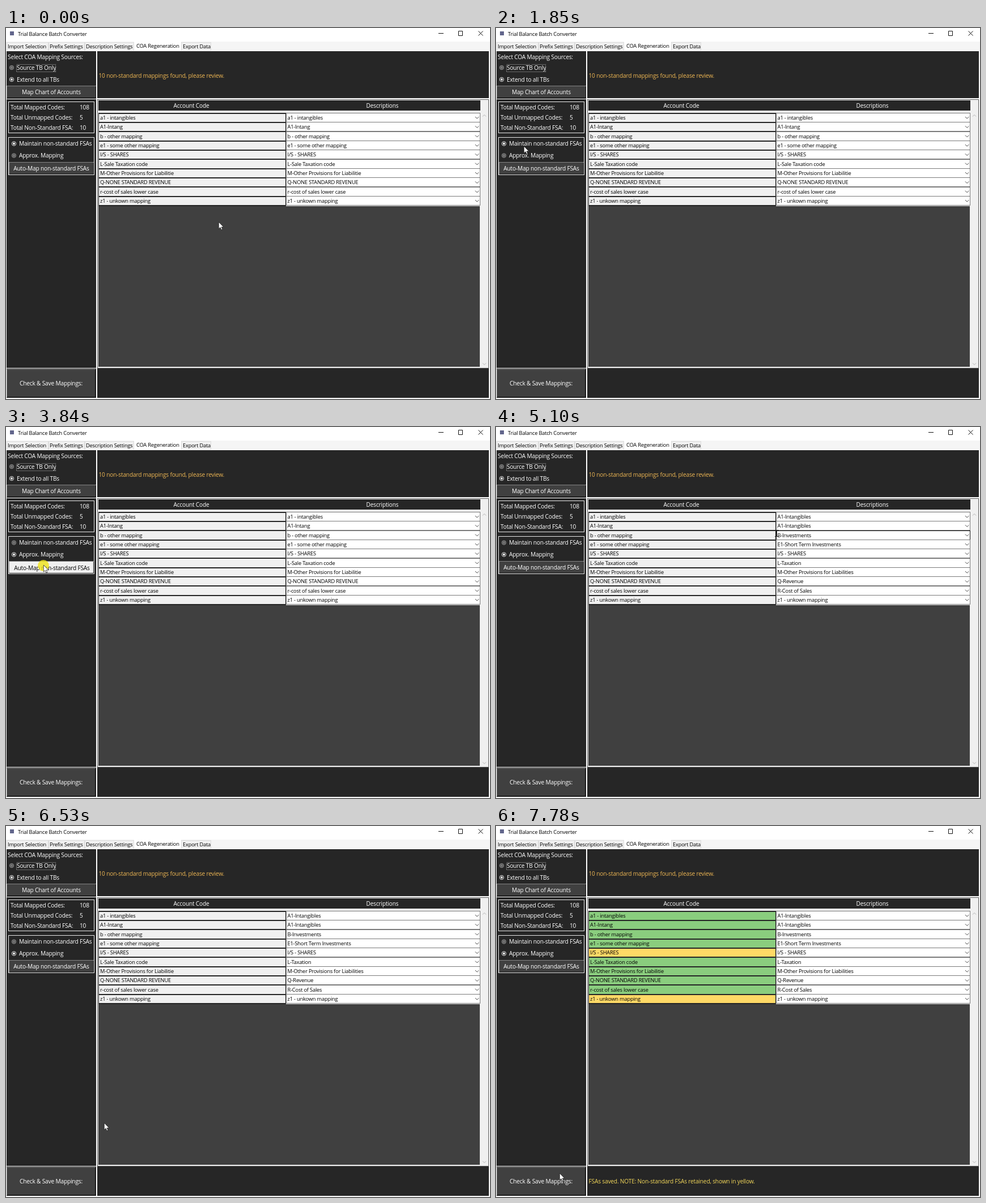
Animation of 854 by 656 pixels, one loop 8000 ms. Source, as an HTML page:

```html
<!DOCTYPE html>
<html lang="en">
<head>
<meta charset="utf-8">
<title>Trial Balance Batch Converter</title>
<style>
  html, body { margin: 0; width: 100%; height: 100%; overflow: hidden; background: #f0f0f0; }
  svg { display: block; }
  text { font: 9.3px "Open Sans", sans-serif; letter-spacing: -0.2px; white-space: pre; }
  text.big { font-size: 10.2px; }
  rect, .crisp { shape-rendering: crispEdges; }
</style>
</head>
<body>
<svg id="stage" width="854" height="656" viewBox="0 0 854 656"></svg>
<script>
const DARK = '#262626', GREY = '#404040', LIGHT = '#f0f0f0';
const LOOP = 8000, ROW_TOP = 150, ROW_STEP = 16.35;

// Account code, description after auto-mapping
const ROWS = [
  ['a1 - intangibles', 'A1-Intangibles'],
  ['A1-Intang', 'A1-Intangibles'],
  ['b - other mapping', 'B-Investments'],
  ['e1 - some other mapping', 'E1-Short Term Investments'],
  ['I/S - SHARES', 'I/S - SHARES'],
  ['L-Sale Taxation code', 'L-Taxation'],
  ['M-Other Provisions for Liabilitie', 'M-Other Provisions for Liabilities'],
  ['Q-NONE STANDARD REVENUE', 'Q-Revenue'],
  ['r-cost of sales lower case', 'R-Cost of Sales'],
  ['z1 - unkown mapping', 'z1 - unkown mapping'],
];

// Cursor moves: start, end, target x, y, optional control point
const MOVES = [
  [250, 1050, 179, 202],
  [1080, 1850, 49, 209],
  [1900, 2620, 12, 227],
  [2740, 3380, 66, 244],
  [4490, 5290, 571, 188, 300, 184],
  [5340, 5780, 478, 238],
  [5950, 6720, 119, 576],
  [6770, 7040, 112, 614],
];

const rect = (x, y, w, h, fill, extra = '') =>
  `<rect x="${x}" y="${y}" width="${w}" height="${h}" fill="${fill}" ${extra}/>`;
const frame = (x, y, w, h, stroke, extra = '') =>
  rect(x + .5, y + .5, w - 1, h - 1, 'none', `stroke="${stroke}" ${extra}`);
const line = (d, stroke, extra = '') => `<path d="${d}" fill="none" stroke="${stroke}" ${extra}/>`;
const label = (x, y, s, fill = '#000', extra = '') =>
  `<text x="${x}" y="${y + 3.5}" fill="${fill}" ${extra}>${s.replace('&', '&amp;')}</text>`;
const big = (x, y, s, fill = '#fff', extra = '') => label(x, y + .2, s, fill, `class="big" ${extra}`);
const mid = 'text-anchor="middle"';

const radio = (id, x, y) => `<g id="${id}" transform="translate(${x} ${y})">
  <circle r="3.7"/><circle r="1.9"/></g>`;
const button = (id, x, y, w, h, s) => `<g id="${id}">${rect(x, y, w, h, GREY)}
  ${line(`M${x} ${y + h - .5}H${x + w - .5}V${y}`, '#181818', 'class="crisp"')}
  ${line(`M${x + .5} ${y + h}V${y + .5}H${x + w}`, '#858585', 'class="crisp"')}
  ${big(x + w / 2, y + h / 2, s, '#fff', mid)}</g>`;

function titleBar() {
  const tabs = [[1, 74, 'Import Selection', 3], [75, 64, 'Prefix Settings', 77],
    [139, 87, 'Description Settings', 141], [309, 53, 'Export Data', 312]];
  return rect(0, 0, 854, 24, '#fff') + rect(0, 24, 854, 16, '#f5f5f5') +
    rect(7, 6, 7, 7, '#62668c') + label(21, 10, 'Trial Balance Batch Converter') +
    line('M763 9.5H772M798.5 5.5H805.5V13.5H798.5ZM833.5 5.5L841.5 13.5M841.5 5.5L833.5 13.5', '#111') +
    tabs.map(([x, w, s, tx]) => rect(x, 25, w, 15, LIGHT) +
      frame(x, 25, w, 16, '#dcdcdc') + label(tx, 32.5, s)).join('') +
    rect(226, 22, 83, 19, '#fff') + label(230, 31, 'COA Regeneration');
}

function leftPanel() {
  const stats = [['Total Mapped Codes:', 108], ['Total Unmapped Codes:', 5], ['Total Non-Standard FSA:', 10]];
  return rect(1, 41, 158, 84, DARK) + rect(1, 126, 158, 475, DARK) + rect(1, 602, 158, 52, DARK) +
    big(3, 51, 'Select COA Mapping Sources:') +
    radio('sourceOnly', 10, 70) + big(19, 70, 'Source TB Only') +
    frame(18, 64, 70, 14, '#aaa', 'stroke-dasharray="1 1"') +
    radio('extendAll', 10, 91) + big(19, 91, 'Extend to all TBs') +
    button('chart', 1, 102, 158, 22, 'Map Chart of Accounts') +
    frame(4, 130, 152, 56, '#e8e8e8') +
    stats.map(([s, n], i) => big(8, 140.5 + i * 17.8, s) + big(130, 140.5 + i * 17.8, '' + n)).join('') +
    frame(4, 193, 152, 67, '#e8e8e8') +
    radio('maintain', 14, 204.5) + big(23, 204.5, 'Maintain non-standard FSAs') +
    radio('approx', 14, 225.5) + big(23, 225.5, 'Approx. Mapping') +
    button('autoMap', 5, 237, 150, 22, 'Auto-Map non-standard FSAs') +
    button('save', 1, 603, 157, 50, 'Check & Save Mappings:');
}

function rightPanel() {
  const rows = ROWS.map(([code], i) => {
    const y = ROW_TOP + i * ROW_STEP, cy = y + 8.4;
    return rect(164, y + 1.5, 329, 14.3, LIGHT, 'class="code"') + label(166, cy, code) +
      rect(494.5, Math.round(y) + .5, 342, 16, '#fff', 'class="combo"') +
      label(496.5, cy, code, '#000', 'class="desc"') +
      line(`M828 ${cy - 1.5}l3.2 3.2l3.2 -3.2`, '#444');
  }).join('');
  return rect(161, 41, 691, 83, DARK) + rect(161, 602, 691, 52, DARK) +
    line('M161.5 126V601H851.5V126Z', '#555', 'class="crisp"') +
    big(163.5, 84, '10 non-standard mappings found, please review.', '#edb653') +
    rect(163, 128, 674, 18, DARK) +
    big(327, 137.5, 'Account Code', '#fff', mid) + big(664, 137.5, 'Descriptions', '#fff', mid) +
    rect(163, 150, 331, 165, DARK) + rows + rect(163, 315, 673, 284, GREY) +
    line('M841 156.5l3 -3l3 3M841 592.5l3 3l3 -3', '#b4b4b4') +
    big(163.5, 628.5, 'FSAs saved. NOTE: Non-standard FSAs retained, shown in yellow.', '#f2d75a', 'id="note"');
}

const $ = id => document.getElementById(id);
const all = name => [...document.getElementsByClassName(name)];

$('stage').innerHTML = rect(0, 0, 854, 656, LIGHT) + titleBar() +
  rect(0, 40, 853, 615, '#fff') + rect(161, 126, 691, 475, LIGHT) +
  leftPanel() + rightPanel() +
  `<g id="cursor"><circle id="glow" cy="1" r="10" fill="#f0e419" opacity=".8"/>
    <path id="arrow" d="M.3 0V12.2L3.1 9.6L5 14L7 13.1L5.1 8.9H9Z" fill="#fff" stroke="#111" stroke-width=".7"/>
    <path id="beam" class="crisp" d="M-3.5 -5.5H3.5M-3.5 5.5H3.5M.5 -5V5" fill="none" stroke="#222"/></g>`;

const codes = all('code'), combos = all('combo'), descs = all('desc');

function setRadio(id, on) {
  const [ring, dot] = $(id).children;
  ring.setAttribute('fill', on ? '#222' : '#555');
  ring.setAttribute('stroke', on ? '#e6e6e6' : '#858585');
  dot.setAttribute('fill', on ? '#fff' : '#777');
}

function setPressed(id, on) {
  const [face, , , text] = $(id).children;
  face.setAttribute('fill', on ? LIGHT : GREY);
  text.setAttribute('fill', on ? '#000' : '#fff');
  text.setAttribute('transform', on ? 'translate(1 1)' : '');
}

function cursorAt(t) {
  let x = 375, y = 343;
  for (const [from, to, tx, ty, cx = (x + tx) / 2, cy = (y + ty) / 2] of MOVES) {
    if (t < from) break;
    const p = Math.min(1, (t - from) / (to - from)), u = p * p * (3 - 2 * p), v = 1 - u;
    x = v * v * x + 2 * u * v * cx + u * u * tx;
    y = v * v * y + 2 * u * v * cy + u * u * ty;
  }
  return [Math.round(x), Math.round(y)];
}

const show = (id, on) => $(id).setAttribute('visibility', on ? 'visible' : 'hidden');

function draw(t) {
  const [x, y] = cursorAt(t);
  const mapping = t >= 3840 && t < 3950, saving = t >= 7450 && t < 7530;
  const mapped = t >= 3950, saved = t >= 7530;
  const inTable = x > 163 && x < 837 && y > 150 && y < 314;
  const hovered = inTable && x > 494 ? Math.floor((y - ROW_TOP) / ROW_STEP) : -1;

  setRadio('maintain', t < 2740);
  setRadio('approx', t >= 2740);
  setPressed('autoMap', mapping);
  setPressed('save', saving);
  show('note', saved);
  ROWS.forEach(([code, desc], i) => {
    const kept = code === desc;
    codes[i].setAttribute('fill', !saved ? LIGHT : kept ? '#ffd966' : '#8acd7e');
    combos[i].setAttribute('stroke', i === hovered ? '#171717' : '#7a7a7a');
    descs[i].textContent = mapped ? desc : code;
  });

  $('cursor').setAttribute('transform', `translate(${x} ${y})`);
  show('glow', mapping || saving);
  show('arrow', !inTable);
  show('beam', inTable);
}

setRadio('sourceOnly', false);
setRadio('extendAll', true);
function tick() {
  draw(performance.now() % LOOP);
  requestAnimationFrame(tick);
}
tick();
</script>
</body>
</html>
```
